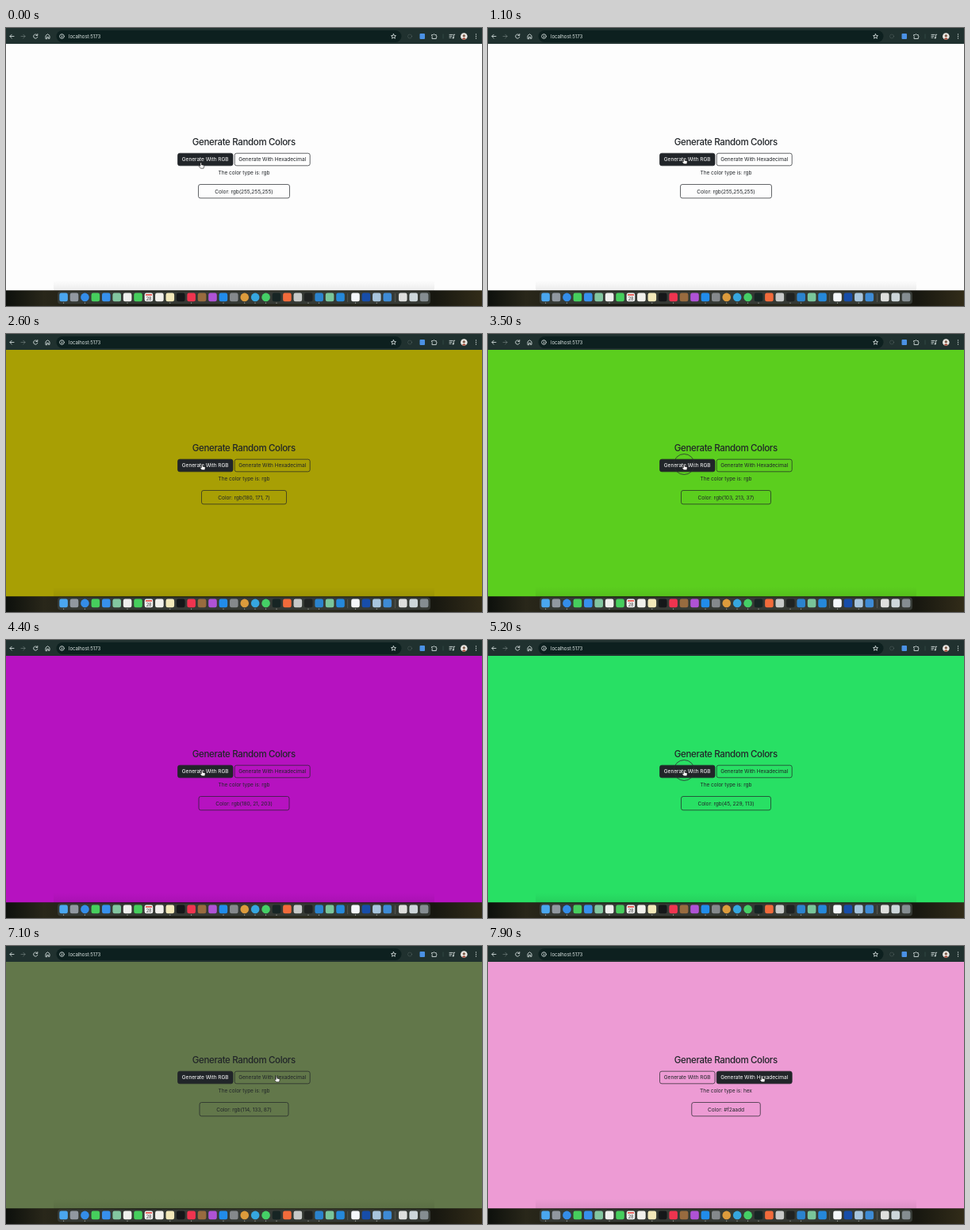
These frames come from a looping animation (600 px wide and 351 px high, 8000 ms). An HTML page:

```html
<!DOCTYPE html>
<html lang="en">
<head>
<meta charset="utf-8">
<title>Random colors</title>
<style>
  html, body { margin: 0; width: 100%; height: 100%; overflow: hidden; background: #12120d; }
  svg { display: block; width: 600px; height: 351px; }
  text { font: 6.6px Inter, "Open Sans", sans-serif; letter-spacing: -.01em; }
  .mid { text-anchor: middle; }
  #title { font-size: 11.5px; font-weight: 500; letter-spacing: -.03em; }
  .line { fill: none; stroke: #cfd9d7; stroke-width: .9; stroke-linecap: round; stroke-linejoin: round; }
  .box { fill: none; stroke: #212529; stroke-width: .7; }
  .on rect { fill: #212529; }
  .on text { fill: #fff; }
</style>
</head>
<body>
<svg viewBox="0 0 600 351">
  <defs>
    <linearGradient id="wall">
      <stop offset="0" stop-color="#0d100c"/>
      <stop offset=".08" stop-color="#29271a"/>
      <stop offset=".3" stop-color="#15160f"/>
      <stop offset=".65" stop-color="#2a291b"/>
      <stop offset=".9" stop-color="#171710"/>
      <stop offset="1" stop-color="#322c19"/>
    </linearGradient>
    <linearGradient id="shade" x2="0" y2="1">
      <stop offset="0" stop-opacity="0"/>
      <stop offset="1" stop-opacity=".07"/>
    </linearGradient>
  </defs>

  <!-- browser bar -->
  <rect width="600" height="21" fill="#20312f"/>
  <rect x="63.5" y="3" width="435" height="15" rx="7.5" fill="#0d201f"/>
  <g class="line">
    <path d="M10 10.5H5M7.2 8.2 4.9 10.5l2.3 2.3"/>
    <path d="M19 10.5h5M21.8 8.2l2.3 2.3-2.3 2.3" opacity=".35"/>
    <path d="M39.4 9a2.6 2.6 0 1 0 .4 2.3M39.8 7.6v1.9h-1.9"/>
    <path d="M50 13.3V9.7l2.5-2 2.5 2v3.6h-1.7v-2h-1.6v2z"/>
    <circle cx="70.5" cy="10.5" r="2.8"/>
    <path d="M70.5 10.4v1.5M70.5 9v.1"/>
    <path d="M488.5 7.6l.9 1.9 2.1.2-1.6 1.4.5 2.1-1.9-1.1-1.9 1.1.5-2.1-1.6-1.4 2.1-.2z"/>
    <circle cx="509" cy="10.5" r="2.5" opacity=".15"/>
    <path d="M537 8.6h1.7q.8-2.2 1.7 0h1.9v1.6q2 .7 0 1.5v1.8H537v-1.7q1.5-.7 0-1.5z"/>
    <path d="M559 8.4h4M559 10.3h3M559 12.2h2M564.3 12.4V8.3h1.4"/>
    <path d="M592.5 8v0M592.5 10.5v0M592.5 13v0" stroke-width="1.3"/>
  </g>
  <circle cx="563.6" cy="12.4" r="1" fill="#cfd9d7"/>
  <rect x="521.5" y="7" width="6.5" height="7" rx="1" fill="#4b91e4"/>
  <path d="M551 7.5v6" stroke="#3c5350" stroke-width=".7"/>
  <circle cx="577.3" cy="10.5" r="4.3" fill="#e9e6e1"/>
  <path d="M574.8 13.8q2.5-3.3 5 0a4.3 4.3 0 0 1-5 0" fill="#a64b3a"/>
  <circle cx="577.3" cy="9.8" r="1.6" fill="#7a5946"/>
  <text x="79" y="12.7" fill="#dbe4e2" style="font-size:6.1px">localhost:5173</text>

  <!-- page -->
  <rect id="page" y="20" width="600" height="311.5"/>
  <rect x="60" y="319" width="480" height="12.5" fill="url(#shade)"/>
  <g id="content" fill="#212529">
    <text id="title" class="mid" x="299.8" y="148.3">Generate Random Colors</text>
    <g id="rgb">
      <rect class="box" x="216.5" y="158.2" width="69.5" height="15.6" rx="2.5"/>
      <text class="mid" x="251.2" y="168.4">Generate With RGB</text>
    </g>
    <g id="hex">
      <rect class="box" x="288.2" y="158.2" width="95" height="15.6" rx="2.5"/>
      <text class="mid" x="335.7" y="168.4">Generate With Hexadecimal</text>
    </g>
    <text id="type" class="mid" x="300" y="184.9"></text>
    <rect id="frame" class="box" y="197.5" height="17.3" rx="2.5"/>
    <text id="value" class="mid" x="300" y="208.7"></text>
  </g>
  <circle id="ring" r="13" fill="none" stroke="#2b2f33" stroke-width=".8"/>
  <path id="hand" fill="#fff" stroke="#111" stroke-width=".6" stroke-linejoin="round"
    d="M-.8 4.2V.5Q0-.7.8.5V2.7L3.3 3.2Q4.2 3.5 4 4.6L3.4 7.2H-.3L-2.5 4.6Q-2.2 3.4-.8 4.2z"/>

  <!-- dock -->
  <rect y="331.5" width="600" height="20" fill="url(#wall)"/>
  <rect x="65" y="332.5" width="470" height="16" rx="4" fill="#363a35"/>
  <path d="M430.7 335v11M490.5 335v11" stroke="#686b66" stroke-width=".6"/>
  <g id="dock"></g>
</svg>
<script>
const $ = id => document.getElementById(id);
const LOOP = 8000;

// change time, page colour, box width, colour type, shown value
const states = [
  [0, '#fdfdfd', 115, 'rgb', 'rgb(255,255,255)'],
  [1620, '#a89f04', 107, 'rgb', 'rgb(180, 171, 7)'],
  [3450, '#5bce1e', 113, 'rgb', 'rgb(103, 213, 37)'],
  [4320, '#b612c0', 114, 'rgb', 'rgb(180, 21, 203)'],
  [5150, '#28e064', 113, 'rgb', 'rgb(45, 229, 113)'],
  [5920, '#62774a', 112, 'rgb', 'rgb(114, 133, 87)'],
  [7450, '#ed9bd4', 86.5, 'hex', '#f2aadd']
];

// pointer path: time, x, y
const path = [
  [0, 245.7, 170], [300, 245.7, 170], [1100, 247.2, 164.5],
  [6400, 247.2, 164.5], [7200, 345.2, 164.5], [LOOP, 345.2, 164.5]
];

// the three dock sections: first centre, then one colour per icon ("o" marks a round one)
const sections = [
  [72.6, '#4aa6ef #9198a0 #348de9o #46ce5d #3790ed #83c6a0 #efefed #46ce5d #f2f2f2 #f1f0eb #f2e8b9 #151719 #ef344f #986b3f #af52d5 #218cea #85898c #dc9b3co #36a6dfo #45cf66o #172524 #f26b3b #c7c9c8 #202322 #2b83ce #79c59a #2588da'],
  [440.5, '#f4f7fa #174da9 #a8c5dd #3e8bd5'],
  [500.3, '#dedfdd #cdd6da #858d91']
];

function buildDock() {
  let svg = '';
  for (const [first, list] of sections) {
    list.split(' ').forEach((c, i) => {
      const x = first + i * 13.42, rx = c.endsWith('o') ? 5.3 : 2.3;
      svg += `<rect x="${x - 5.3}" y="334.6" width="10.6" height="10.6" rx="${rx}" fill="${c.slice(0, 7)}"/>`;
    });
  }
  for (const x of [72.6, 99.4, 153, 206.8, 233.6, 274, 300.7, 314, 327.5, 341, 381, 394.5, 440.5, 467.3]) {
    svg += `<circle cx="${x}" cy="347.2" r=".6" fill="#aeb1ab"/>`;
  }
  svg += '<rect x="176" y="336" width="8" height="1.8" fill="#e65952"/>' +
    '<text class="mid" x="180" y="343.8" fill="#333" style="font-size:5.5px">28</text>';
  $('dock').innerHTML = svg;
}

function pointer(t) {
  const i = path.findIndex(p => p[0] > t);
  const [t0, x0, y0] = path[i - 1], [t1, x1, y1] = path[i];
  const u = (t - t0) / (t1 - t0), k = u * u * (3 - 2 * u);
  return [x0 + (x1 - x0) * k, y0 + (y1 - y0) * k];
}

// the ring shows while the button is held; the page changes shortly before release
const pressed = t => states.some(([at]) => at && t > at - 130 && t < at + 70);

function draw(t) {
  const [, color, width, type, value] = states.filter(s => s[0] <= t).pop();
  $('page').setAttribute('fill', color);
  $('frame').setAttribute('x', 300 - width / 2);
  $('frame').setAttribute('width', width);
  $('type').textContent = 'The color type is: ' + type;
  $('value').textContent = 'Color: ' + value;
  for (const id of ['rgb', 'hex']) $(id).classList.toggle('on', id === type);

  const [x, y] = pointer(t);
  for (const id of ['hand', 'ring']) $(id).setAttribute('transform', `translate(${x} ${y})`);
  $('ring').style.display = pressed(t) ? '' : 'none';
}

function tick() {
  draw(performance.now() % LOOP);
  requestAnimationFrame(tick);
}

buildDock();
tick();
</script>
</body>
</html>
```
